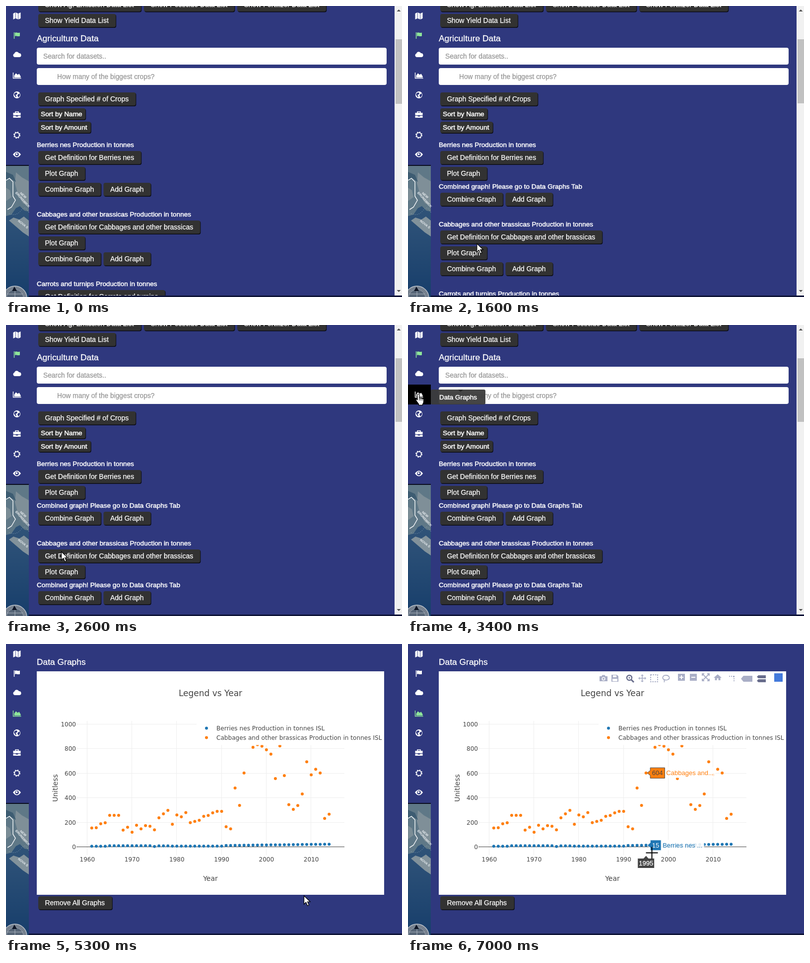
An HTML page that plays this animation: 798x586 px, repeating every 7100 ms.

```html
<!DOCTYPE html>
<html lang="en">
<head>
<meta charset="utf-8">
<title>Data Graphs</title>
<style>
html, body { margin: 0; width: 100%; height: 100%; overflow: hidden; background: #2f387e; }
svg { display: block; width: 798px; height: 586px; }
text { white-space: pre; }
</style>
</head>
<body>
<svg id="stage" viewBox="0 0 798 586" xmlns="http://www.w3.org/2000/svg"></svg>
<script>
const LOOP = 7100, STEP = 100;
const BLUE = '#2f387e', GREEN = '#8ee59a';
const SANS = '"Liberation Sans", Arial, sans-serif';
const PLOT = '"DejaVu Sans", Verdana, sans-serif';
const stage = document.getElementById('stage');
const pen = document.createElement('canvas').getContext('2d');

function measure(str, size, font = SANS) {
  pen.font = `${size}px ${font}`;
  return pen.measureText(str).width;
}

const rect = (x, y, w, h, fill, more = '') =>
  `<rect x="${x}" y="${y}" width="${w}" height="${h}" fill="${fill}" ${more}/>`;
const circle = (x, y, r, fill, more = '') =>
  `<circle cx="${x}" cy="${y}" r="${r}" fill="${fill}" ${more}/>`;
const path = (d, fill, more = '') => `<path d="${d}" fill="${fill}" ${more}/>`;
const line = (d, color, width = 1) => path(d, 'none', `stroke="${color}" stroke-width="${width}"`);
const at = (x, y, body) => `<g transform="translate(${x} ${y})">${body}</g>`;

// Text is placed by its vertical middle.
function text(str, x, cy, size, fill = '#fff', more = '', font = SANS) {
  return `<text x="${x}" y="${cy + size * 0.35}" font-size="${size}" fill="${fill}" font-family='${font}' ${more}>${str}</text>`;
}
const heavy = (str, x, cy, size = 13.55, color = '#fff', weight = 0.5) =>
  text(str, x, cy, size, color, `stroke="${color}" stroke-width="${weight}"`);
const title = (str, cy) => heavy(str, 62, cy, 17.4, '#fff', 0.3);
const plotText = (str, x, cy, size, more = '') => text(str, x, cy, size, '#444', more, PLOT);

function box(x, y, w, h) {
  return rect(x + 1, y + 1, w, h + 0.5, '#0b0c14', 'rx="4"') + rect(x, y, w, h, '#323232', 'rx="4"');
}
function button(str, x, cy) {
  return box(x, cy - 13, measure(str, 14) + 27.5, 26.5) + heavy(str, x + 13.4, cy, 14, '#fff', 0.25);
}
function smallButton(str, cy) {
  return box(65, cy - 11, measure(str, 13.7) + 11.5, 22.5) + heavy(str, 70, cy, 13.7);
}

// Pointer path: time, x, y.
const track = [
  [300, 330, 590], [900, 142, 378], [1200, 142, 378], [1900, 136, 544], [2300, 136, 544],
  [3300, 21, 139], [3900, 21, 139], [4200, 312, 404], [4700, 430, 440], [5300, 600, 507],
  [5600, 590, 450], [6000, 585, 350], [6400, 575, 400], [6800, 480, 421], [7000, 491.5, 420.5]
];
function pointer(t) {
  if (t <= track[0][0]) return track[0].slice(1);
  for (let i = 1; i < track.length; i++) {
    const [t0, x0, y0] = track[i - 1], [t1, x1, y1] = track[i];
    if (t <= t1) {
      const k = (t - t0) / (t1 - t0), e = k * k * (3 - 2 * k);
      return [x0 + (x1 - x0) * e, y0 + (y1 - y0) * e];
    }
  }
  return track[track.length - 1].slice(1);
}
const within = (t, a, b) => t >= a && t < b;
const inPlot = ([x, y]) => x > 142 && x < 682 && y > 155 && y < 425;

function cursor(t) {
  if (t < 300) return '';
  const p = pointer(t), [x, y] = p;
  if (within(t, 800, 1500) || within(t, 1900, 2500) || within(t, 3200, 4000)) {
    return at(x - 5, y - 1,
      path('M5 1q2 0 2 2v6q2-1 3 .5q2-.8 3 .8q2.5-.5 2.5 2v4q0 3-2 5v2h-8v-2l-5-7q-1-2 .8-2.6q1.2-.2 2 1l-.3 .6v-10.3q0-2 2-2z',
        '#fff', 'stroke="#000" stroke-width="1.2"') + line('M7 9v5M10 10v4M13 11v3', '#000'));
  }
  if (t >= 4300 && inPlot(p)) return at(x, y, line('M-12 0h24M0-12v24', '#000', 2));
  return at(x, y, path('M.5 0v17l4-4 3 7 3-1.3-3-6.7h5.5z', '#fff', 'stroke="#000" stroke-width="1.2"'));
}

const icons = [
  [20, c => path('M-7.5-5l4.5-2v12l-4.5 2zM-2.2-7l4.4 2v12l-4.4-2zM3-5l4.5-2v12l-4.5 2z', c)],
  [59, c => line('M-5.5-6v13', c, 1.5) + path('M-4-5c3-2.5 5 1.5 10-.5v7c-5 2-7-2-10 .5z', c)],
  [98, c => path('M-4.5 5a3.8 3.8 0 0 1-.5-7.3a4.8 4.8 0 0 1 9-.7a4 4 0 0 1 1 8z', c)],
  [140, c => line('M-7.5-6v11.5h16', c, 1.4) + path('M-5.5 4v-4l3.5-4.5 3.5 3 3-2 3 5v2.5z', c)],
  [179, c => circle(0, 0, 7, c) + path('M-2-5l3 1-1 3-3 1 2 3-1 2-3-4-1-3zM2-1l4-2v5l-3 3-2-3z', BLUE)],
  [219, c => line('M-3-4v-2h6v2', c, 1.6) + path('M-7.5-4h15v5h-15zM-7.5 2h5v1.5h5v-1.5h5v4h-15z', c)],
  [260, c => circle(0, 0, 4.8, 'none', `stroke="${c}" stroke-width="1.7"`) +
    circle(0, 0, 6.3, 'none', `stroke="${c}" stroke-width="1.5" stroke-dasharray="2.5 2.45"`)],
  [299, c => path('M-8 0q8-11 16 0q-8 11-16 0z', c) + circle(0, 0, 3.8, BLUE) + circle(-0.5, -0.8, 2, c)]
];

function map() {
  const label = (str, x, y, a) =>
    `<g transform="translate(${x} ${y}) rotate(${a})">${text(str, 0, 0, 6.5, '#e8edf0', 'font-weight="bold"')}</g>`;
  return rect(0, 321, 46, 265, 'url(#sea)') +
    path('M0 321h46v93l-9-2-9-9-8 4-9 13-11 3z', '#5f7887') +
    path('M20 335l12 10 14 8v50l-12-6-10-18-6-22z', '#7f8f98') +
    path('M0 334l14 6 6 14-10-6-10 4z', '#3d5c72') +
    path('M6 432l9-6 12 4 9-6 10 8v32l-12-8-14-12z', '#82929b') +
    path('M0 366l8 5 3 14-11 8z', '#7b8d96') +
    line('M0 351l7-4 7 7v29l5 8-8 14-8 5', '#f0f3f5', 1.5) +
    path('M6 418q15 6 24-6t16 4', 'none', 'stroke="#b4c6d2" stroke-dasharray="1 3"') +
    label('NEW', 29, 376, 42) + label('BRUNSWICK', 20, 375, 48) + label('NOVA S', 25, 432, 38) +
    circle(18, 588, 24, '#75808e', 'stroke="#bac1c9" stroke-width="1.5"') +
    circle(18, 588, 17, '#566577', 'stroke="#99a3b0"') +
    line('M18 564v22M2 580h32', '#aeb7c2') + path('M17 565l5 9h-10z', '#0c1424');
}

function sidebar(t) {
  const hot = within(t, 3200, 4300), active = t < 4000 ? 1 : 3;
  return map() + rect(0, 0, 46, 320, BLUE) + rect(0, 320, 46, 2, '#0a0d20') +
    (hot ? rect(0, 120, 46, 40, '#000') : '') +
    icons.map(([y, draw], i) => at(22, y, draw(i === active ? GREEN : '#fff'))).join('');
}

function tooltip(t) {
  if (!within(t, 3200, 4300)) return '';
  return rect(46, 130, 110, 30, '#3c3c3c', 'rx="3" opacity=".95"') +
    path('M101 130h10l-5 5z', '#2c2c2c') + heavy('Data Graphs', 63, 145, 13.4);
}

function combineRow(cy, hover, focus) {
  if (!hover) return button('Combine Graph', 65, cy) + button('Add Graph', 196.5, cy);
  const edge = focus ? 'stroke="#2d7fdc" stroke-width="1.4"' : 'rx="4" stroke="#35a0c4"';
  return rect(62.5, cy - 13.5, 133, 30, '#323232', edge) +
    heavy('Combine Graph', 77, cy + 1, 14.7, '#fff', 0.25) + button('Add Graph', 198.5, cy + 1);
}

function listPanel(t) {
  const crops = [
    ['Berries nes', t >= 1200, within(t, 800, 1500), within(t, 1200, 1300)],
    ['Cabbages and other brassicas', t >= 2200, within(t, 1900, 2500), within(t, 2000, 2300)],
    ['Carrots and turnips', false, false, false]
  ];
  let y = 279, out = '';
  for (const [name, combined, hover, focus] of crops) {
    const row = y + 90 + (combined ? 20 : 0);
    out += heavy(`${name} Production in tonnes`, 62, y) +
      button(`Get Definition for ${name}`, 65, y + 26) + button('Plot Graph', 65, y + 58) +
      (combined ? heavy('Combined graph! Please go to Data Graphs Tab', 62, y + 84) : '') +
      combineRow(row, hover, focus);
    y = row + 50 + (hover ? 2 : 0);
  }
  const field = (str, x, top) =>
    rect(62, top, 705, 34, '#fff', 'rx="4"') + heavy(str, x, top + 17, 13.75, '#959595', 0.25);
  const notes = (t >= 1200) + (t >= 2200);
  return button('Show Ag. Emission Data List', 65, -2.5) + button('Show Pesticide Data List', 278, -2.5) +
    button('Show Fertilizer Data List', 466, -2.5) + button('Show Yield Data List', 65, 29) +
    title('Agriculture Data', 65) +
    field('Search for datasets..', 75, 84) + field('How many of the biggest crops?', 103, 125) +
    button('Graph Specified # of Crops', 65, 187) +
    smallButton('Sort by Name', 217) + smallButton('Sort by Amount', 244) + out +
    rect(783, 0, 15, 583, '#f1f1f1') + rect(785, 67, 13, 130 - notes, '#c1c1c1') +
    path('M787.5 11l4-4 4 4z', '#505050') + path('M787.5 572l4 4 4-4z', '#505050');
}

const cabbages = [
  156, 158, 190, 198, 259, 259, 259, 139, 162, 121, 178, 149, 175, 170, 141, 239, 271, 299,
  186, 262, 247, 281, 199, 209, 218, 251, 258, 279, 291, 291, 166, 149, 481, 340, 604, 880,
  813, 834, 822, 793, 757, 558, 824, 583, 346, 307, 339, 433, 695, 589, 634, 604, 234, 268
];
function berries(year) {
  if (year > 1990) return Math.round(13 + (year - 1991) * 0.45);
  if (year === 1975) return 5;
  return year < 1965 ? 7 : year < 1975 ? 11 : year < 1979 ? 10 : 8;
}
const series = [
  ['Berries nes Production in tonnes ISL', '#1f77b4', '#fff', berries],
  ['Cabbages and other brassicas Production in tonnes ISL', '#ff7f0e', '#444', y => cabbages[y - 1961]]
];
const px = year => 163.8 + (year - 1960) * 9.025;
const py = value => 409 - value * 0.2472;

function buildChart() {
  let out = rect(62, 55, 700, 450, '#fff') +
    plotText('Legend vs Year', 412, 99, 17, 'text-anchor="middle"') +
    plotText('Year', 412, 472, 14, 'text-anchor="middle"') +
    `<g transform="translate(99 290) rotate(-90)">${plotText('Unitless', 0, 0, 14, 'text-anchor="middle"')}</g>`;
  for (let year = 1960; year <= 2010; year += 10) {
    out += line(`M${Math.round(px(year)) - 0.5} 155v270`, '#eee') +
      plotText(year, px(year), 433.5, 12, 'text-anchor="middle"');
  }
  for (let v = 0; v <= 1000; v += 200) {
    out += line(`M142 ${Math.round(py(v)) - 0.5}h540`, v ? '#eee' : '#444') +
      plotText(v, 141, py(v), 12, 'text-anchor="end"');
  }
  for (const [, color, , value] of series) {
    for (let year = 1961; year <= 2014; year++) out += circle(px(year), py(value(year)), 3, color);
  }
  out += rect(384, 155, 378, 48.5, '#fff');
  series.forEach(([name, color], i) => {
    out += circle(404, 169.5 + i * 19, 3, color) +
      plotText(name, 424, 169.5 + i * 19, 12, 'letter-spacing=".06"');
  });
  return out;
}

function buildModebar() {
  const c = '#a9aec6', d = '#686d8c';
  const corners = 'M-7-3v-4h4M3-7h4v4M7 3v4h-4M-3 7h-4v-4';
  return [
    [394, path('M-8-4h4l1.5-2.5h5l1.5 2.5h4v10h-16z', c) + circle(0, 1, 3.5, '#fff') + circle(0, 1, 2, c)],
    [417, path('M-7-7h11l3 3v11h-14z', c) + rect(-4, -6, 7, 4, '#fff') + rect(-5, 1, 10, 5, '#fff')],
    [447, circle(-1, -1, 5, 'none', `stroke="${d}" stroke-width="2.4"`) + line('M3 3l5 5', d, 3) + line('M-3-1h4M-1-3v4', d)],
    [472, line('M-7 0h14M0-7v14', c, 1.6) + path('M-8 0l3-3v6zM8 0l-3-3v6zM0-8l3 3h-6zM0 8l3-3h-6z', c)],
    [496, rect(-7, -7, 14, 14, 'none', `stroke="${c}" stroke-width="2" stroke-dasharray="2.5 2"`)],
    [520, path('M-4 3c-6-4-1-10 5-9s8 7 2 9-7-2-7 0 2 2 0 5', 'none', `stroke="${c}" stroke-width="1.8"`)],
    [551, rect(-7, -9, 14, 14, c) + line('M-4-2h8M0-6v8', '#fff', 2)],
    [575, rect(-7, -9, 14, 14, c) + line('M-4-2h8', '#fff', 2)],
    [600, at(0, -2, line(corners, c, 1.8) + line('M-6-6l12 12M6-6l-12 12', c, 1.8))],
    [624, at(0, -2, path('M-8 1l8-7 8 7h-2.5v5h-4v-4h-3v4h-4v-5z', c))],
    [653, path('M-6-5h2v2h-2zM-2-5h2v2h-2zM2-5h3v3h-3zM3 0h2v2h-2zM3 4h2v2h-2z', c)],
    [683, path('M-12 1l5-6h18v12h-18z', c)],
    [712, path('M-9-3l3-3h15v6h-15zM-9 5l3-3h15v6h-15z', d)],
    [747, rect(-9, -10, 17, 17, '#447adb')]
  ].map(([x, body]) => at(x, 69, body)).join('');
}
const chart = buildChart(), modebar = buildModebar();

// The labels trail the pointer slightly.
function hoverLabels(t) {
  const seen = pointer(t - 200);
  if (!inPlot(pointer(t)) || !inPlot(seen)) return '';
  const year = Math.round((seen[0] - 163.8) / 9.025) + 1960, x = px(year);
  const tags = series.map(([name, color, ink, value]) => {
    const v = value(year), y = py(v), w = measure(v, 13) + 7.5, short = name.slice(0, 12) + '...';
    return rect(x + 8 + w, y - 11, measure(short, 13) + 7, 21, '#fff', 'opacity=".88"') +
      path(`M${x + 2.5} ${y}l6-5v-5.5h${w}v21h${-w}v-5.5z`, color, `stroke="${ink}"`) +
      text(v, x + 12, y, 13, ink) + text(short, x + w + 11.5, y, 13, color);
  });
  return tags.join('') +
    path(`M${x} 426l5 5.5h12v20h-34v-20h12z`, '#444', 'stroke="#fff"') +
    text(year, x, 441.5, 13, '#fff', 'text-anchor="middle" stroke="#fff" stroke-width=".3"');
}

function graphPanel(t) {
  const over = t >= 4300 && pointer(t)[1] < 505;
  return title('Data Graphs', 36) + chart +
    (over ? modebar + hoverLabels(t) : '') + button('Remove All Graphs', 65, 521);
}

const defs = `<defs><linearGradient id="sea" x2="0" y2="1"><stop stop-color="#365a78"/>
<stop offset=".45" stop-color="#2c5077"/><stop offset="1" stop-color="#173e6b"/></linearGradient></defs>`;

function draw(t) {
  stage.innerHTML = defs + rect(0, 0, 798, 586, BLUE) +
    (t < 4000 ? listPanel(t) : graphPanel(t)) +
    rect(46, 583, 752, 3, '#10163a') + sidebar(t) + tooltip(t) + cursor(t);
}

const start = performance.now();
let shown = -1;
function tick() {
  const t = Math.floor(((performance.now() - start) % LOOP) / STEP) * STEP;
  if (t !== shown) draw(shown = t);
  requestAnimationFrame(tick);
}
tick();
</script>
</body>
</html>
```
